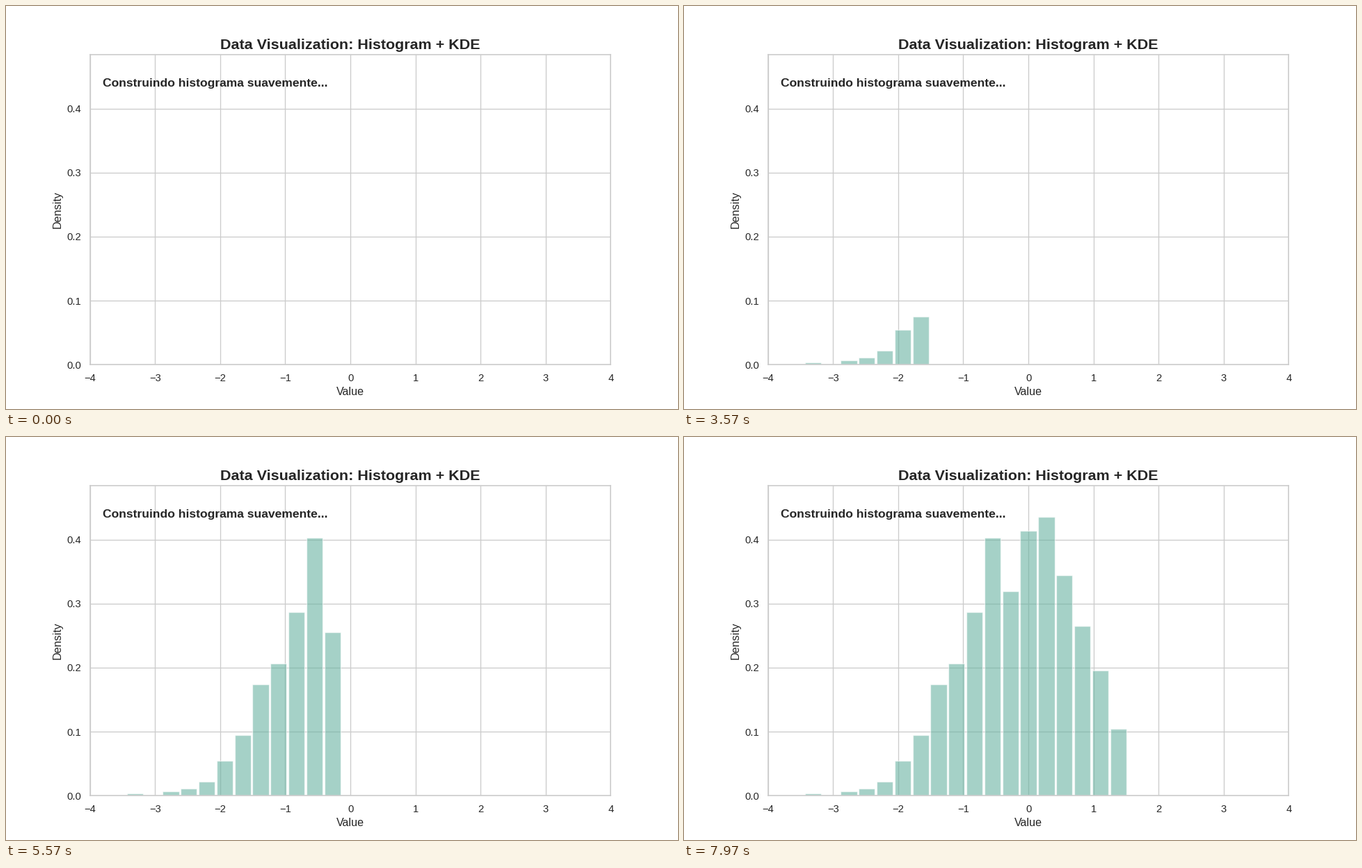
Write a matplotlib script that moves like this. It is 966 px wide and 580 px high and loops after 8000 ms.

```python
import numpy as np
import matplotlib.pyplot as plt
from matplotlib.animation import FuncAnimation

DPI = 96
LOOP, TICK = 8000, 40          # ms
LEAD, STEP = 120, 80           # start of growth, time per growth step (ms)
STEPS_PER_BAR = 5
INK, LINE = "0.15", "0.8"

plt.rcParams.update({
    "font.family": "Liberation Sans",
    "text.color": INK,
    "axes.labelcolor": INK,
    "axes.edgecolor": LINE,
    "axes.linewidth": 1.25,
    "axes.labelsize": 12.08,
    "axes.titlesize": 16.1,
    "axes.axisbelow": True,
    "axes.grid": True,
    "grid.color": LINE,
    "grid.linewidth": 1,
})
for axis in ("xtick", "ytick"):
    plt.rcParams.update({
        f"{axis}.color": INK,
        f"{axis}.labelsize": 11.07,
        f"{axis}.major.size": 6,
        f"{axis}.major.pad": 3.5,
    })
plt.rcParams["xtick.bottom"] = False
plt.rcParams["ytick.left"] = False

# Histogram of 1000 samples in 29 equal bins; the last bins stay empty here
edges = np.linspace(-4, 4, 30)
width = edges[1] - edges[0]
counts = np.zeros(len(edges) - 1)
counts[2:20] = [1, 0, 2, 3, 6, 15, 26, 48, 57, 79, 111, 88, 114, 120, 95, 73, 54, 36]
density = counts / (1000 * width)
order = np.arange(len(density))

fig, ax = plt.subplots(figsize=(966 / DPI, 580 / DPI), dpi=DPI, facecolor="white")
bars = ax.bar(edges[:-1] + width / 2, np.zeros_like(density), width=0.9 * width,
              color="#69b3a2", edgecolor="white", linewidth=1, alpha=0.6)
ax.set_xlim(-4, 4)
ax.set_ylim(0, 0.4846)
ax.set_yticks(np.arange(5) / 10)
ax.set_title("Data Visualization: Histogram + KDE", weight="bold")
ax.set_xlabel("Value")
ax.set_ylabel("Density")
ax.text(-3.8, 0.4345, "Construindo histograma suavemente...",
        fontsize=13.08, weight="bold")


def update(frame):
    """Bars rise one after another, each in equal steps."""
    step = max(0, (frame * TICK - LEAD) // STEP)
    grown = np.clip((step + 1) / STEPS_PER_BAR - order, 0, 1)
    for bar, height in zip(bars, density * grown):
        bar.set_height(height)
    return list(bars)


anim = FuncAnimation(fig, update, frames=LOOP // TICK, interval=TICK,
                     repeat=True, repeat_delay=0, blit=False)
plt.show()
```
